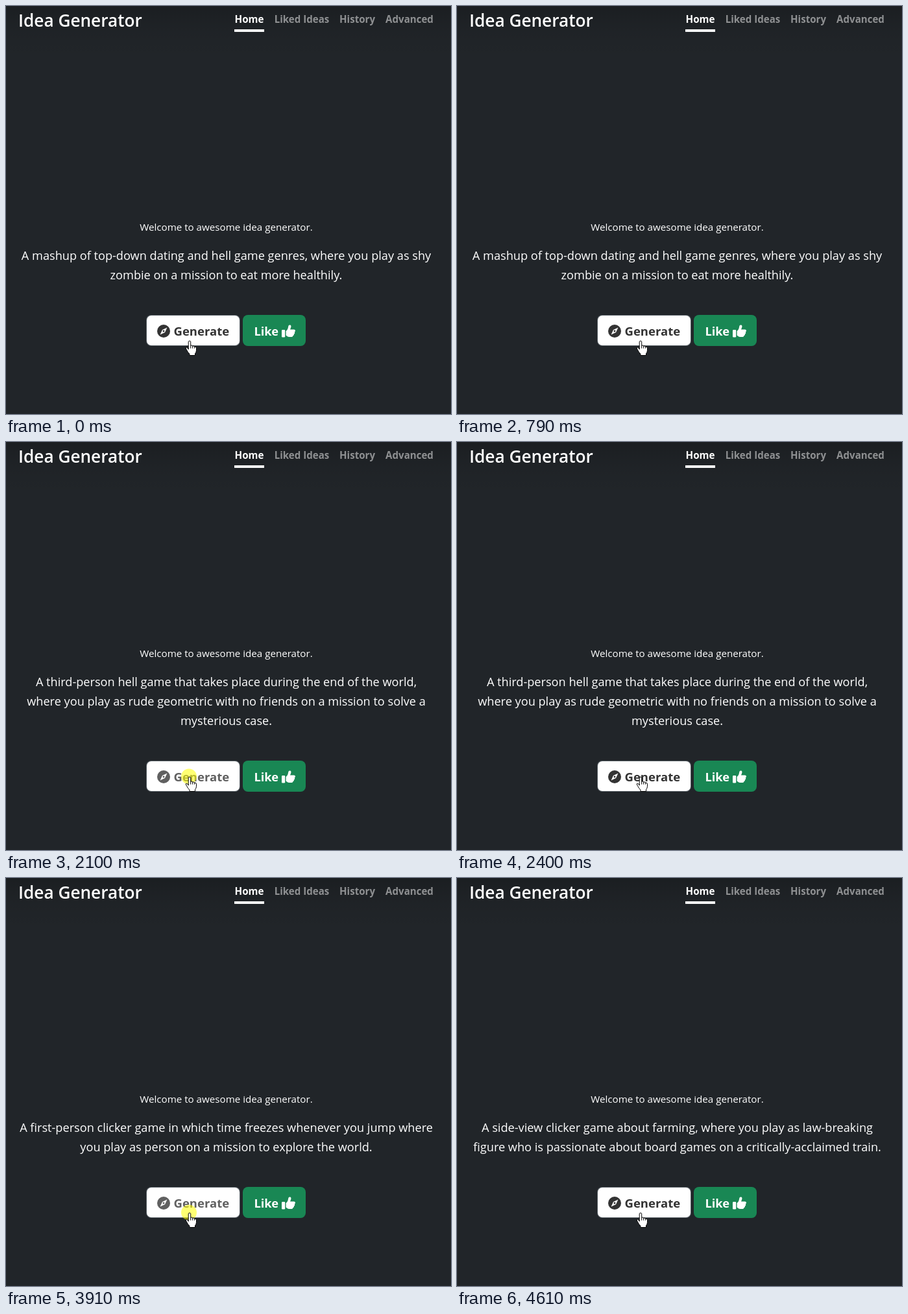
Recreate the animation shown at these times as an HTML page with a canvas. Size 686x630 px, loop 6240 ms.

```html
<!DOCTYPE html>
<html lang="en">
<head>
<meta charset="utf-8">
<title>Idea Generator</title>
<style>
  html, body { margin: 0; width: 100%; height: 100%; overflow: hidden; background: #212529; }
  canvas { display: block; }
</style>
</head>
<body>
<canvas id="stage" width="686" height="630"></canvas>
<script>
const ctx = document.getElementById('stage').getContext('2d');
const LOOP = 6240, STEP = 100, CENTER = 339.5;

const ideas = [
  { from: 0, lines: [
    'A mashup of top-down dating and hell game genres, where you play as shy',
    'zombie on a mission to eat more healthily.'] },
  { from: 1290, lines: [
    'A third-person hell game that takes place during the end of the world,',
    'where you play as rude geometric with no friends on a mission to solve a',
    'mysterious case.'] },
  { from: 2800, lines: [
    'A first-person clicker game in which time freezes whenever you jump where',
    'you play as person on a mission to explore the world.'] },
  { from: 4610, lines: [
    'A side-view clicker game about farming, where you play as law-breaking',
    'figure who is passionate about board games on a critically-acclaimed train.'] }
];

// Label fade toward white per step; the highlight shows for the first `held` steps.
const presses = [
  { from: 590, fade: [0.22, 0.4], held: 1 },
  { from: 2100, fade: [0.22, 0.9, 0.4], held: 2 },
  { from: 3910, fade: [0.22, 0.9, 0.4], held: 2 }
];

function text(str, x, y, size, weight, color, align = 'center') {
  ctx.font = `${weight} ${size}px "Open Sans", "Noto Sans", sans-serif`;
  ctx.textAlign = align;
  ctx.fillStyle = color;
  ctx.fillText(str, x, y);
}

function box(x, y, w, h, r, color) {
  ctx.fillStyle = color;
  ctx.beginPath();
  ctx.roundRect(x, y, w, h, r);
  ctx.fill();
}

function disc(x, y, r, color) {
  ctx.fillStyle = color;
  ctx.beginPath();
  ctx.arc(x, y, r, 0, Math.PI * 2);
  ctx.fill();
}

function shape(d, x, y, fill, stroke) {
  const path = new Path2D(d);
  ctx.save();
  ctx.translate(x, y);
  if (fill) { ctx.fillStyle = fill; ctx.fill(path); }
  if (stroke) { ctx.strokeStyle = stroke; ctx.lineWidth = 1; ctx.stroke(path); }
  ctx.restore();
}

function drawBackground() {
  ctx.fillStyle = '#212529';
  ctx.fillRect(0, 0, 686, 630);
  const shade = ctx.createLinearGradient(0, 0, 0, 85);
  [0.19, 0.11, 0.05, 0.018, 0].forEach((a, i) => shade.addColorStop(i / 4, `rgba(0,0,0,${a})`));
  ctx.fillStyle = shade;
  ctx.fillRect(0, 0, 686, 85);
}

function drawHeader() {
  text('Idea Generator', 19, 32, 26.2, 600, '#fff', 'left');
  const dim = 'rgba(255,255,255,0.5)';
  text('Home', 375, 26, 15.2, 700, '#fff');
  text('Liked Ideas', 456, 26, 15.1, 700, dim);
  text('History', 541.5, 26, 15.1, 700, dim);
  text('Advanced', 622, 26, 15.1, 700, dim);
  ctx.fillStyle = '#fff';
  ctx.fillRect(352, 36, 46, 4);
}

function drawGenerate(y, fade) {
  box(216, y, 145, 48, 8, '#565e64');
  box(217, y + 1, 143, 46, 7, '#fff');
  const level = Math.round(51 + 204 * fade);
  const ink = `rgb(${level},${level},${level})`;
  disc(243, y + 25, 10, ink);
  shape('M5.4 -5.4 L2 2 L-5.4 5.4 L-2 -2 Z', 243, y + 25, '#fff');
  disc(243, y + 25, 1.4, ink);
  text('Generate', 301.3, y + 32, 18.5, 700, ink);
}

function drawLike(y) {
  box(365, y, 97, 48, 8, '#198754');
  text('Like', 401.3, y + 32, 18.3, 700, '#fff');
  box(425, y + 23, 5.2, 11.5, 1.2, '#fff');
  shape('M6.6 10 C9 8 9.7 6 10.2 3 C10.5 .7 12 .2 13.1 .6 C14.8 1.2 14.9 3 13.6 6 L13 7.4 '
      + 'L18.8 7.4 Q21 7.6 21 9.4 Q20.9 10.8 19.8 11.2 Q21 13.6 18.9 14.6 '
      + 'Q19.6 16.5 17.4 17.2 Q17.4 19 15.3 19 L11.8 19 Q9.8 19 8.2 17.8 L6.6 16.6 Z',
    425, y + 15, '#fff');
}

function drawCursor() {
  const x = 276.7, y = 516.7;
  shape('M4.5 13.5 L4.5 2 Q4.5 .5 6.2 .5 Q8 .5 8 2 L8 7.5 Q10.6 6.8 11 8.3 '
      + 'Q13.5 7.8 14 9.3 Q16.8 9 16.8 11.5 L16.8 15 Q16.6 18 14.8 20 L14.8 22.8 L6.2 22.8 '
      + 'L6.2 20.5 Q3.5 18 2.2 15 L.7 12.3 Q.2 10.4 1.7 10.4 Q3.2 10.6 4.5 13.5 Z',
    x, y, '#fff', '#000');
  shape('M8 7.5 V12 M11 8.3 V12 M14 9.3 V12', x, y, null, '#000');
}

function pressAt(t) {
  for (const { from, fade, held } of presses) {
    const step = Math.floor((t - from) / STEP);
    if (step >= 0 && step < fade.length) return { fade: fade[step], lit: step < held };
  }
  return { fade: 0, lit: false };
}

function draw(t) {
  const { lines } = ideas.findLast(idea => t >= idea.from);
  const shift = (lines.length - 2) * 15;
  const press = pressAt(t);
  drawBackground();
  drawHeader();
  text('Welcome to awesome idea generator.', CENTER, 347 - shift, 15.15, 400, '#fff');
  lines.forEach((line, i) => text(line, CENTER, 392 - shift + i * 30, 18.15, 400, '#fff'));
  drawGenerate(477 + shift, press.fade);
  drawLike(477 + shift);
  if (press.lit) disc(282, 516.5, 12, 'rgba(255,255,0,0.55)');
  drawCursor();
}

function tick() {
  draw(performance.now() % LOOP);
  requestAnimationFrame(tick);
}
tick();
</script>
</body>
</html>
```
